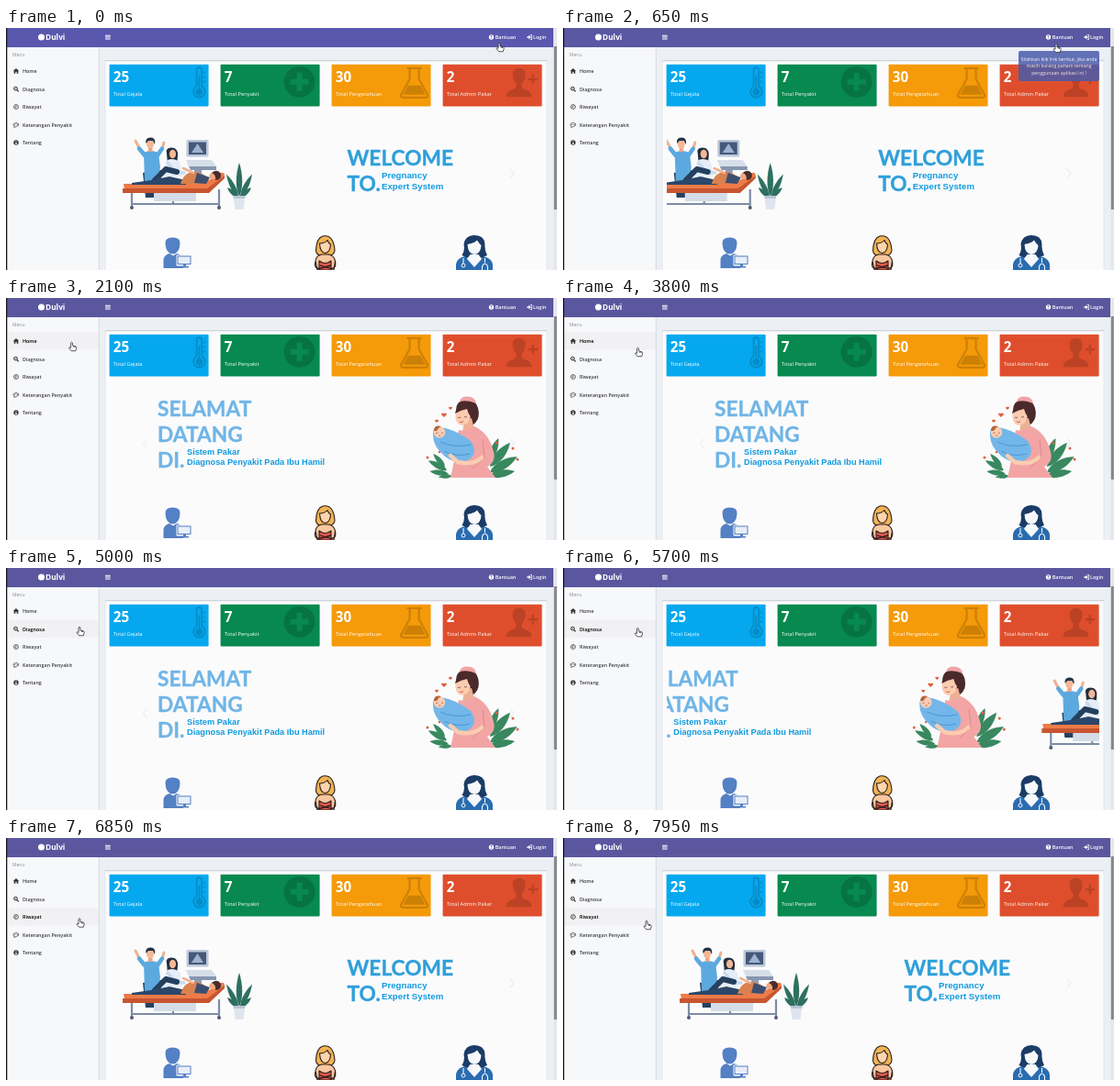
An HTML page that plays this animation: 600 px wide and 264 px high, repeating every 8000 ms.

```html
<!DOCTYPE html>
<html lang="id">
<head>
<meta charset="utf-8">
<title>Sistem Pakar</title>
<style>
html, body { margin: 0; width: 100%; height: 100%; overflow: hidden; background: #ecf0f5; }
svg { display: block; width: 100vw; height: 100vh; }
text { font-family: "Open Sans", "Noto Sans", sans-serif; }
.semi { font-weight: 600; }
.num { font-size: 15.2px; font-weight: 700; }
.label { font-size: 5.8px; }
.big { font: 700 22.7px Lato, "Open Sans", sans-serif; stroke-width: .35; }
.sub { font-family: "Liberation Sans", Arial, sans-serif; font-weight: 700; fill: #119be0; }
.tip { font-size: 5.2px; fill: #fff; text-anchor: middle; }
</style>
</head>
<body>
<svg viewBox="0 0 600 264" preserveAspectRatio="none">
  <defs>
    <clipPath id="frame"><rect x="113" y="88" width="471" height="118"/></clipPath>
    <path id="leaf" d="M0 0C-5 -5 -4 -13 0 -19C4 -13 5 -5 0 0Z"/>
  </defs>

  <!-- page -->
  <rect width="600" height="264" fill="#ecf0f5"/>
  <rect x="108" y="36" width="481" height="228" fill="#fbfbfc"/>
  <rect x="108" y="35" width="481" height="1.3" fill="#cfd3da"/>
  <path d="M108 36V264M589 36V264" stroke="#dde1e8" stroke-width=".7"/>

  <!-- sidebar -->
  <rect x="1" y="21" width="100" height="243" fill="#f7f8fa"/>
  <rect id="hover" x="1.5" width="99.5" height="19.5" fill="#f1f1f3"/>
  <path d="M101.3 21V264" stroke="#d2d6de" stroke-width=".8"/>
  <text x="7" y="31.3" font-size="5" fill="#8d8d92">Menu</text>
  <g id="menu"></g>

  <g id="cards"></g>

  <!-- carousel -->
  <path d="M153.500 153.500L149.500 158.500L153.500 163.500M549 153.500L553 158.500L549 163.500" fill="none" stroke="#e6e7ea" stroke-width="1"/>
  <g clip-path="url(#frame)">
    <g id="welcome">
      <g fill="#2f9fda" stroke="#2f9fda">
        <text class="big" x="371.500" y="150.300">WELCOME</text>
        <text class="big" x="371.500" y="178">TO.</text>
      </g>
      <text class="sub" x="409" y="164" font-size="9.7">Pregnancy</text>
      <text class="sub" x="409" y="175.7" font-size="9.7">Expert System</text>

      <!-- man with raised arms -->
      <path d="M149 158L152 185H167L169 155Z" fill="#27415f"/>
      <path d="M151 137L145 131L141 123M165 137L170 132L172 125" fill="none" stroke="#f2b08e" stroke-width="3" stroke-linecap="round"/>
      <path d="M151 139L145 131.500M165 139L170 131.500" stroke="#5ba9df" stroke-width="4.500" stroke-linecap="round"/>
      <path d="M150 136Q157 132 166 136L168 152L165 167H151Z" fill="#5ba9df"/>
      <rect x="155" y="129" width="4.500" height="6" fill="#e9a584"/>
      <ellipse cx="157" cy="126.500" rx="4" ry="5" fill="#f5b796"/>
      <path d="M152.500 126Q151 120 157 119.500Q163.500 119 162 127L160 123H155Z" fill="#263344"/>

      <!-- ultrasound -->
      <path d="M205 146H213V176H205Z" fill="#8f9db3"/>
      <rect x="196.500" y="122" width="24" height="18.500" rx="1.500" fill="#bcc8d9"/>
      <rect x="199" y="124.500" width="19" height="13.500" fill="#46587a"/>
      <path d="M208.500 126L215 136H202Z" fill="#9db3cf"/>
      <path d="M196 144H224L229 151H199Z" fill="#d6deea"/>
      <path d="M199 151H229V155H201Z" fill="#8796b0"/>

      <!-- seated woman -->
      <path d="M175 137Q173 131 180 130.500Q188 130.500 187 140L186 148H176Z" fill="#232f40"/>
      <ellipse cx="181.500" cy="137.500" rx="3.600" ry="4.700" fill="#f5b796"/>
      <path d="M176 144Q183 141 190 147L192 162H171Q171 151 176 144Z" fill="#e5eef7"/>
      <path d="M176 147L184 157L194 158" fill="none" stroke="#c9dced" stroke-width="3.400" stroke-linecap="round"/>
      <path d="M186 157L174 154L162 166" fill="none" stroke="#24405e" stroke-width="6" stroke-linecap="round" stroke-linejoin="round"/>

      <!-- bed and patient -->
      <path d="M137 178V195M232 176V195M137 192H232M182 177V192" stroke="#7c8ca5" stroke-width="2.200"/>
      <path d="M161 179H207V189H161Z" fill="#d4dce8"/>
      <path d="M128 170L216 169L234 158Q238 157 238 161L219 176L129 176Z" fill="#ee7b48"/>
      <path d="M127 175H219L238 161V164L221 180H127Z" fill="#c65531"/>
      <path d="M137 169L158 166L178 162L196 166L196 171H137Z" fill="#2b476a"/>
      <path d="M190 170Q194 156 207 157Q215 158 221 165L216 170Z" fill="#d9814f"/>
      <path d="M208 158L222 163L218 170L205 169Z" fill="#3d4f70"/>
      <ellipse cx="226" cy="161" rx="5" ry="3.800" fill="#f0a880" transform="rotate(-25 226 161)"/>
      <path d="M224 158Q230 153 234 159Q235 166 228 166Q229 160 224 158Z" fill="#4a2d2b"/>
      <path d="M193 153L204 158" stroke="#f2b08e" stroke-width="2.500" stroke-linecap="round"/>
      <g fill="#515e77"><circle cx="137" cy="196" r="2"/><circle cx="232" cy="196" r="2"/></g>

      <!-- plant -->
      <g fill="#2e7060">
        <use href="#leaf" transform="translate(254 184) scale(.95 1.95)"/>
        <use href="#leaf" transform="translate(253 185) rotate(-27) scale(.8 1.500)"/>
        <use href="#leaf" transform="translate(255 185) rotate(27) scale(.8 1.500)"/>
        <use href="#leaf" transform="translate(253 185) rotate(-48) scale(.7 .85)"/>
        <use href="#leaf" transform="translate(255 185) rotate(48) scale(.7 .85)"/>
      </g>
      <path d="M247.500 183H260.500L258.500 198H249.500Z" fill="#dfe5ee"/>
      <path d="M247.500 183H260.500L260 186H248Z" fill="#b9c5d6"/>
    </g>

    <g id="selamat">
      <g fill="#70b5e6" stroke="#70b5e6">
        <text class="big" x="165" y="128.700">SELAMAT</text>
        <text class="big" x="165" y="156.500">DATANG</text>
        <text class="big" x="165" y="184.500">DI.</text>
      </g>
      <text class="sub" x="197" y="171.300" font-size="9.200">Sistem Pakar</text>
      <text class="sub" x="197" y="182" font-size="9.200">Diagnosa Penyakit Pada Ibu Hamil</text>

      <!-- foliage -->
      <g id="foliage" fill="#39885f"></g>
      <g fill="#e0603f">
        <circle cx="459" cy="174" r="1.500"/><circle cx="472" cy="168" r="1.300"/>
        <circle cx="534" cy="158" r="1.500"/><circle cx="552" cy="164" r="1.500"/><circle cx="557" cy="176" r="1.500"/>
        <path d="M477 130L474 127Q474 124.500 477 126Q480 124.500 480 127Z"/>
        <path d="M469 136L467 134Q467 132 469 133Q471 132 471 134Z"/>
        <path d="M484 122L482 120Q482 118 484 119Q486 118 486 120Z"/>
      </g>

      <!-- mother -->
      <path d="M490 125Q489 113 499 111Q511 110 514 120Q517 132 509 138L498 136Z" fill="#4a2a2b"/>
      <path d="M494 113Q495 107 503 107.500Q511 108 512 115Q503 111 494 113Z" fill="#f1a3a6"/>
      <path d="M499 133L507 131L511 147H497Z" fill="#eeb094"/>
      <path d="M490 124Q496 117 504 121Q508 129 503 136Q497 141 492 137Q488 131 490 124Z" fill="#fbccb0"/>
      <path d="M489 126Q491 116 501 115L508 122L507 131Q503 126 502 121Q496 122 489 126Z" fill="#4a2a2b"/>
      <path d="M492 130Q493 131.500 495 130M499 129.500Q500.500 131 502 129" fill="none" stroke="#57302f" stroke-width=".7"/>
      <path d="M494 135Q496 136.500 498 134.500" fill="none" stroke="#cf4c55" stroke-width=".9"/>
      <path d="M493 144Q502 146 510 140Q526 147 531 168Q534 179 524 184L533 196H484Q489 176 490 160Z" fill="#f3a5a5"/>
      <path d="M519 154L521 174L508 186" fill="none" stroke="#d98389" stroke-width=".8"/>

      <!-- baby -->
      <path d="M465 150Q464 139 474 141Q491 144 506 156Q514 167 506 175Q494 184 478 173Q465 162 465 150Z" fill="#73b7ea"/>
      <path d="M473 157Q487 164 506 160M477 167Q490 174 505 170" fill="none" stroke="#4e96d2" stroke-width="1"/>
      <circle cx="472" cy="146.500" r="6.200" fill="#fbcdb2"/>
      <path d="M466 145Q466 138 474 140Q470 142 469 145Z" fill="#b5643f"/>
      <path d="M468 147Q469 148 470.500 147M474 147Q475 148 476 147M471 150H473.500" fill="none" stroke="#7d4640" stroke-width=".6"/>
      <path d="M518 174Q509 183 492 179L484 172" fill="none" stroke="#fbccb0" stroke-width="4.500" stroke-linecap="round"/>
    </g>
  </g>

  <!-- feature icons -->
  <g fill="#5480c4">
    <path d="M171.500 262V253Q172 247.500 178 246L182 248.500L186 246Q192 247.500 193 251V262Z"/>
    <path d="M173.500 235Q173 228.500 181.500 228.500Q190 228.500 189.500 235Q189 246 181.500 246.500Q174 246 173.500 235Z"/>
    <rect x="185.500" y="247.500" width="17" height="12" rx="1" fill="#fbfbfc"/>
    <rect x="187" y="249" width="14" height="8.500" fill="#e8eef8" stroke="#5480c4"/>
    <path d="M193 258H196V260H199V261.500H190V260H193Z"/>
  </g>
  <g stroke="#2b1c1a" stroke-width="1.100" stroke-linejoin="round">
    <path d="M337.500 243Q338 229 345 227Q357 225 358 243Q357 249 347.500 249Q338 249 337.500 243Z" fill="#f0b455"/>
    <path d="M339 264L337 254Q338 248 344 247H351Q357 248 358.500 254L357 264Z" fill="#f8c79f"/>
    <path d="M341 264V254Q347.500 259 354 254V264Z" fill="#e2584f"/>
    <path d="M341.500 235Q347 235 350 231.500Q351 235 353.500 236Q353 245 347.500 245.500Q342 245 341.500 235Z" fill="#ffd5ae"/>
    <path d="M337 255Q335 262 341 262.500L354 259M358.500 255Q360 262 354 262.500L342 259" fill="none" stroke-width="1.300"/>
  </g>
  <g>
    <path d="M490 264V258Q491 251 500 249L509.500 254L519 249Q529 251 530 258V264Z" fill="#2a6cb0"/>
    <path d="M496.500 248Q500 243 498.500 236Q500 226 510 226Q521 226 521.500 236Q521 243 524 248Q517 252 510 250Q503 252 496.500 248Z" fill="#1b3c66"/>
    <path d="M502.500 236Q510 235 513 231.500Q516 236 517.500 237Q517 246.500 510 247Q503 246.500 502.500 236Z" fill="#f6f8fb"/>
    <path d="M505.500 247H514.500L518 252L510 261L502 252Z" fill="#f6f8fb"/>
    <path d="M498 251V257M521.500 251V256M518.500 264V260Q521.500 254 524.500 260V264" fill="none" stroke="#f6f8fb" stroke-width="1.100"/>
    <circle cx="498" cy="259" r="2" fill="none" stroke="#f6f8fb"/>
  </g>

  <!-- header -->
  <rect id="bar" width="596" height="21"/>
  <g fill="#fff">
    <circle cx="38.500" cy="10" r="3.500"/>
    <text x="43" y="13" font-size="8.300" font-weight="700">Dulvi</text>
    <path d="M108 7.700H113.700V8.700H108ZM108 9.600H113.700V10.600H108ZM108 11.500H113.700V12.500H108Z"/>
    <circle cx="528.500" cy="10" r="2.700"/>
    <text x="527.300" y="11.700" font-size="4.800" font-weight="700" fill="#5a579f">?</text>
    <text class="semi" x="532.700" y="12" font-size="5.500">Bantuan</text>
    <path d="M567.300 9.200H569.300V7.700L572 10L569.300 12.300V10.800H567.300ZM570.700 7.300H573V12.700H570.700V12H572.300V8H570.700Z"/>
    <text class="semi" x="574" y="12" font-size="5.500">Login</text>
  </g>

  <g id="tip">
    <path d="M538 25L540 22.500L542 25Z" fill="#4b5cab"/>
    <rect x="496" y="25" width="88" height="33" rx="2" fill="#4b5cab"/>
    <text class="tip" x="540" y="35.500">Silahkan klik link berikut, jika anda</text>
    <text class="tip" x="540" y="43.200">masih kurang paham tentang</text>
    <text class="tip" x="540" y="51">penggunaan aplikasi ini !</text>
  </g>

  <!-- window edges -->
  <rect width="1.300" height="264" fill="#17171b"/>
  <rect x="596" width="4" height="264" fill="#e6e7ea"/>
  <rect x="596.800" y="20" width="3" height="178" fill="#85868c"/>

  <g id="cursor" stroke="#1c1c1f" stroke-width=".8" stroke-linejoin="round" fill="#fff">
    <path id="hand" transform="scale(.9)" d="M-1 1Q0 -.7 1 1V4.300L4.800 5.200Q6 5.700 5.700 7.500L4.700 10.800H-.500L-3.300 7.300Q-3.500 5.700 -1 7ZM2.500 4.800V6.500M4 5.200V6.700"/>
    <path id="arrow" d="M0 0V7.500L1.700 6L3 8.700L4.100 8.200L2.900 5.600H5.300Z" fill="#111" stroke="#fff" stroke-width=".4"/>
  </g>
</svg>

<script>
const $ = id => document.getElementById(id);
const LOOP = 8000, WIDTH = 471, SLIDE = 575, ROW = 19.5, MENU_TOP = 37;

const menu = [
  ['Home', '<path d="M11 -3L14.200 0H13.300V2.700H11.700V.7H10.300V2.700H8.700V0H7.800Z"/>'],
  ['Diagnosa', '<path d="M12 1.200L13.800 2.900" stroke="#333" stroke-width="1.200"/><circle cx="10.500" cy="-.4" r="1.900" fill="none" stroke="#333"/><path d="M9.500 -.7H11.500V0H9.500Z"/>'],
  ['Riwayat', '<circle cx="11" r="2.400" fill="none" stroke="#333" stroke-width=".8"/><path d="M11 -1.400V.4H9.800" fill="none" stroke="#333" stroke-width=".7"/>'],
  ['Keterangan Penyakit', '<path d="M9 1.800Q7.400 .5 8.300 -1Q11 -3.200 13.700 -1Q14.700 1.200 11.300 2L8.700 2.900Z" fill="none" stroke="#333" stroke-width=".7"/><path d="M9.300 -.4H10V.3H9.300ZM10.700 -.4H11.400V.3H10.700ZM12.100 -.4H12.800V.3H12.100Z"/>'],
  ['Tentang', '<circle cx="11" r="2.700"/><path d="M10.500 -1.800H11.500V-.9H10.500ZM10.300 -.4H11.500V1.300H12V1.900H10.100V1.300H10.500V.2H10.300Z" fill="#fff"/>']
];
$('menu').innerHTML = menu.map(([name, icon], i) =>
  `<g transform="translate(0 ${47 + i * ROW})" fill="#333">${icon}
   <text class="semi" x="18" y="2.200" font-size="5.400">${name}</text></g>`).join('');

const cards = [
  ['25', 'Total Gejala', '#05a8ee',
    '<path d="M95 24V6A2.800 2.800 0 0 1 100.600 6V24A6.300 6.300 0 1 1 95 24Z" fill="none" stroke="#000" stroke-width="1.800"/><path d="M97 12H98.600V26A4 4 0 1 1 97 26ZM102 8H104.500V9.500H102ZM102 13H104.500V14.500H102ZM102 18H104.500V19.500H102Z"/>'],
  ['7', 'Total Penyakit', '#07894f',
    '<path fill-rule="evenodd" d="M69 19A17 17 0 1 1 103 19A17 17 0 1 1 69 19ZM83 9V16H76V22H83V29H89V22H96V16H89V9Z"/>'],
  ['30', 'Total Pengetahuan', '#f59a08',
    '<path d="M82 4H98M85 5V16L75.500 33Q75 36 78 36H102Q105 36 104.500 33L95 16V5" fill="none" stroke="#000" stroke-width="2.200"/><path d="M83 23H97L102 33H78Z"/>'],
  ['2', 'Total Admin Pakar', '#df4e2c',
    '<path d="M69 35.500Q69 29 77 27Q80.500 26 80 21Q76 17 76 11Q76 4 83 4Q90 4 90 11Q90 17 86 21Q85.500 26 89 27Q97 29 97 35.500ZM97 11V15H93V17.500H97V21.500H99.500V17.500H103.500V15H99.500V11Z"/>']
];
$('cards').innerHTML = cards.map(([num, label, color, icon], i) =>
  `<g transform="translate(${112.6 + i * 121} 39.8)"><rect width="108" height="45.600" rx=".8" fill="${color}"/>
   <g opacity=".16">${icon}</g>
   <g fill="#fff"><text class="num" x="4.200" y="19.700">${num}</text><text class="label" x="4.400" y="34.700">${label}</text></g></g>`).join('');

// x, y, angle and scale of each leaf
const leaves = [
  [482, 192, -82, 1.1], [480, 188, -62, 1.2], [478, 184, -42, 1], [486, 194, -95, .8],
  [526, 194, 80, 1.5], [527, 190, 60, 1.8], [527, 184, 40, 1.8], [527, 176, 22, 1.3]
];
$('foliage').innerHTML = leaves.map(([x, y, a, s]) =>
  `<use href="#leaf" transform="translate(${x} ${y}) rotate(${a}) scale(${s * .8} ${s})"/>`).join('');

// time, x, y of the pointer tip
const path = [
  [0, 537, 16], [780, 537, 17], [1000, 114, 51], [1400, 76, 49], [1750, 71.5, 48],
  [3250, 71.5, 48], [3700, 81.5, 54], [3850, 81.5, 54], [4050, 82, 58], [4250, 81, 63],
  [4850, 80, 64], [5600, 80, 64], [6050, 86, 69], [6300, 87, 85], [6850, 80, 87.5],
  [7700, 80, 87.5], [7950, 91, 90], [8000, 91, 90]
];

const clamp = v => Math.min(1, Math.max(0, v));
const ramp = (t, a, b) => clamp((t - a) / (b - a));
const mix = (a, b, k) => a + (b - a) * k;

// cubic-bezier(.42, 0, .58, 1)
function easeInOut(x) {
  let lo = 0, hi = 1;
  for (let i = 0; i < 20; i++) {
    const s = (lo + hi) / 2, r = 1 - s;
    if (1.26 * r * r * s + 1.74 * r * s * s + s * s * s < x) lo = s; else hi = s;
  }
  return lo * lo * (3 - 2 * lo);
}

function pointer(t) {
  const i = Math.max(1, path.findIndex(p => p[0] >= t));
  const [t0, x0, y0] = path[i - 1], [t1, x1, y1] = path[i];
  const k = ramp(t, t0, t1);
  return [mix(x0, x1, k), mix(y0, y1, k)];
}

function place(id, x) {
  $(id).setAttribute('transform', `translate(${x.toFixed(2)} 0)`);
  $(id).style.display = Math.abs(x) >= WIDTH ? 'none' : '';
}

function draw(t) {
  const first = easeInOut(ramp(t, 552, 552 + SLIDE));
  const second = easeInOut(ramp(t, 5540, 5540 + SLIDE));
  place('selamat', WIDTH * (1 - first - second));
  place('welcome', second > 0 ? WIDTH * (1 - second) : -WIDTH * first);

  const [x, y] = pointer(t);
  $('cursor').setAttribute('transform', `translate(${x.toFixed(2)} ${y.toFixed(2)})`);
  const onMenu = x < 101, onHelp = x > 524 && y < 21;
  $('hand').style.display = onMenu || onHelp ? '' : 'none';
  $('arrow').style.display = onMenu || onHelp ? 'none' : '';

  const row = Math.floor((y - MENU_TOP) / ROW);
  $('hover').style.display = onMenu ? '' : 'none';
  $('hover').setAttribute('y', MENU_TOP + row * ROW);
  [...$('menu').children].forEach((g, i) =>
    g.lastElementChild.setAttribute('fill', onMenu && i === row ? '#000' : '#3c3c40'));

  $('tip').setAttribute('opacity', 0.85 * ramp(t, 50, 200) * (1 - ramp(t, 1030, 1180)));
  $('bar').setAttribute('fill', `rgb(90,87,${Math.round(mix(174, 159, ramp(t, 0, 900)))})`);
}

function tick(now) {
  draw(now % LOOP);
  requestAnimationFrame(tick);
}
draw(0);
requestAnimationFrame(tick);
</script>
</body>
</html>
```
